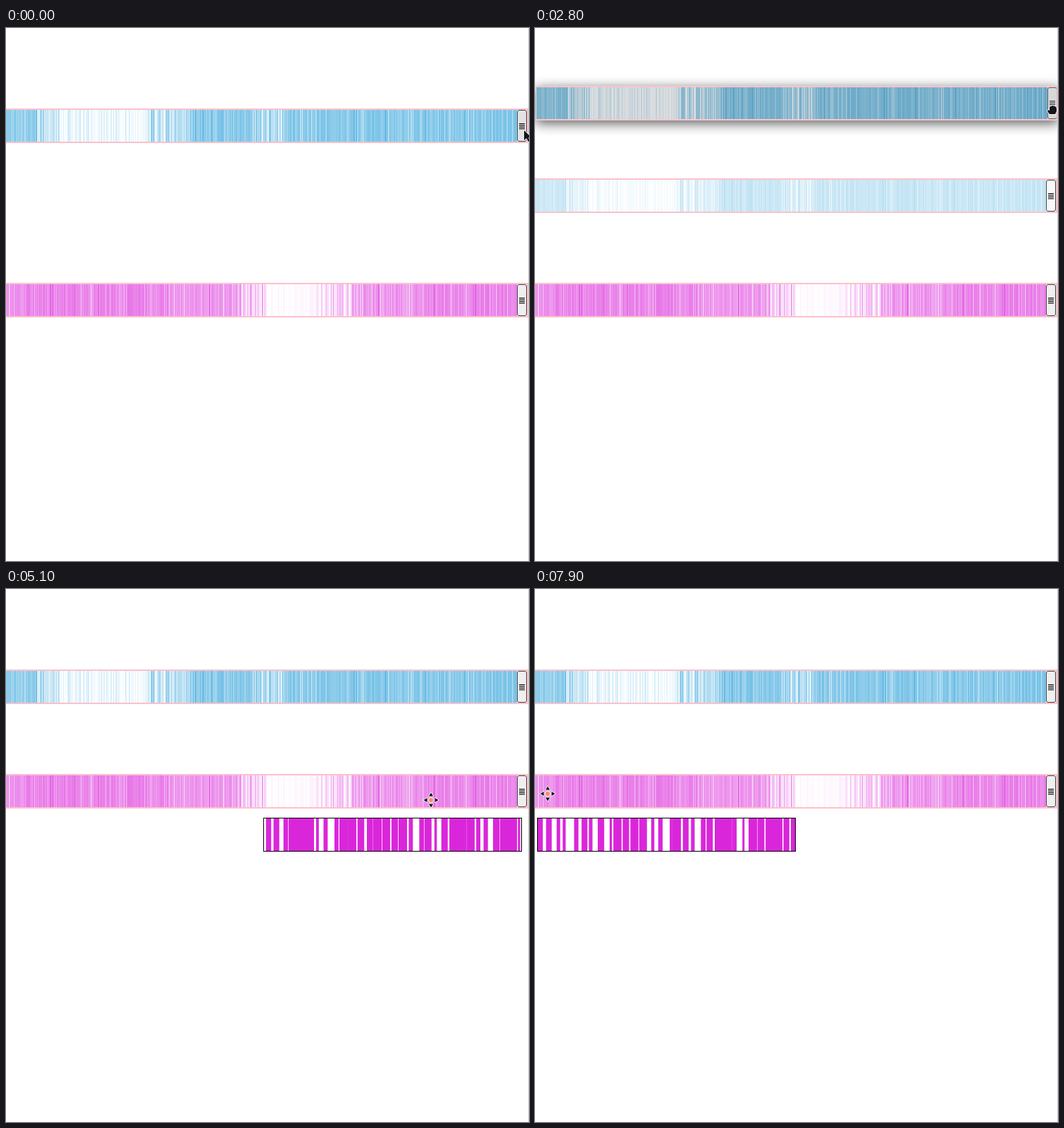
Animation, 742 px wide and 755 px high, one loop 8000 ms. Source, as an HTML page with a canvas:

```html
<!DOCTYPE html>
<html lang="en">
<head>
<meta charset="utf-8">
<title>Reordering stripe tracks</title>
<style>
html, body { margin: 0; width: 100%; height: 100%; overflow: hidden; background: #fff; }
canvas { display: block; }
</style>
</head>
<body>
<canvas id="stage" width="742" height="755"></canvas>
<script>
const ctx = document.getElementById('stage').getContext('2d');
const W = 742, H = 755, LOOP = 8000, STEP = 100;
const DATA_W = 725, ROW_H = 49, GRAB_Y = 31;
const LENS_W = 367, LENS_Y = 324, LENS_H = 48, ZOOM = 24;
const LENS_START = 4400;
const MAGENTA = '#da26da';

// [x, mean coverage]
const blueDensity = [[0, .5], [41, .5], [44, .3], [70, .27], [76, .1], [199, .06], [205, .3],
  [245, .28], [267, .53], [345, .54], [349, .38], [390, .38], [393, .53], [725, .55]];
const pinkDensity = [[0, .53], [224, .53], [228, .44], [315, .47], [340, .2], [368, .2],
  [370, .02], [433, .02], [453, .15], [490, .22], [518, .46], [582, .42], [585, .53], [725, .53]];

// [time, x, y]
const cursorPath = [[0, 735, 145], [300, 735, 145], [1200, 735, 215], [1400, 735, 215],
  [1700, 735, 244], [2000, 735, 244], [2400, 735, 128], [2800, 735, 113], [2900, 735, 113],
  [3400, 735, 392], [4000, 735, 301], [4200, 735, 301], [LENS_START, 722, 295],
  [5800, 483, 303], [6300, 356, 296], [7000, 131, 287], [7900, 18, 290]];

const drags = [
  { row: 'blue', from: 400, to: 1300 },
  { row: 'blue', from: 2100, to: 3000 },
  { row: 'pink', from: 3500, to: 4100 }
];

function seeded(seed) {
  return () => {
    seed = (seed + 0x6D2B79F5) | 0;
    let v = Math.imul(seed ^ (seed >>> 15), 1 | seed);
    v = (v + Math.imul(v ^ (v >>> 7), 61 | v)) ^ v;
    return ((v ^ (v >>> 14)) >>> 0) / 4294967296;
  };
}

// Linear interpolation through points of the form [key, ...values]
function along(points, key) {
  const i = points.findIndex(p => p[0] > key);
  if (i < 0) return points[points.length - 1].slice(1);
  const a = points[i - 1], b = points[i];
  const k = (key - a[0]) / (b[0] - a[0]);
  return a.slice(1).map((v, j) => v + (b[j + 1] - v) * k);
}

function makeStripes(color, density, seed) {
  const strip = document.createElement('canvas');
  strip.width = DATA_W;
  strip.height = ROW_H - 4;
  const c = strip.getContext('2d');
  const rand = seeded(seed);
  c.fillStyle = color;
  for (let x = 0; x < DATA_W; x++) {
    const [d] = along(density, x);
    // Sparse areas get a few strong lines, dense areas an even tone
    const skew = Math.max(.2, 2.5 - 5 * d);
    const accent = rand() < d * .06 ? .25 : 0;
    c.globalAlpha = Math.min(.85, d * (skew + 1) * rand() ** skew + accent);
    c.fillRect(x, 0, 1, strip.height);
  }
  return strip;
}

const strips = {
  blue: makeStripes('#2ca0d9', blueDensity, 11),
  pink: makeStripes(MAGENTA, pinkDensity, 29)
};

function drawBorder(x, y) {
  ctx.fillStyle = '#ffc0cb';
  ctx.fillRect(x, y, 741, 2);
  ctx.fillRect(x, y + ROW_H - 2, 741, 2);
  ctx.fillRect(x + 739, y, 2, ROW_H);
}

function drawHandle(x, y, fill) {
  ctx.beginPath();
  ctx.roundRect(x + 725.5, y + 2.5, 13, 44, 2.5);
  ctx.fillStyle = fill;
  ctx.fill();
  ctx.strokeStyle = '#444';
  ctx.lineWidth = 1;
  ctx.stroke();
  ctx.fillStyle = '#000';
  for (let i = 0; i < 4; i++) ctx.fillRect(x + 728, y + 21 + i * 2.4, 8, 1.1);
}

function drawRow(strip, y, faded, hover) {
  ctx.globalAlpha = faded ? .45 : 1;
  ctx.drawImage(strip, 0, y + 2);
  ctx.globalAlpha = 1;
  drawHandle(0, y, hover ? '#e3e3e3' : faded ? '#f8f8f8' : '#efefef');
  drawBorder(0, y);
}

function drawGhost(strip, y) {
  const x = 2;
  ctx.save();
  ctx.shadowColor = 'rgba(0,0,0,.65)';
  ctx.shadowBlur = 17;
  ctx.shadowOffsetY = 4;
  ctx.fillStyle = '#dedede';
  ctx.fillRect(x - 1, y, W, ROW_H);
  ctx.restore();
  ctx.save();
  ctx.globalCompositeOperation = 'multiply';
  ctx.drawImage(strip, x, y + 2);
  ctx.globalAlpha = .75;
  drawHandle(x, y, '#f5f5f5');
  ctx.restore();
  ctx.globalAlpha = .85;
  drawBorder(x - 1, y);
  ctx.globalAlpha = 1;
}

function drawLens(cursorX) {
  const left = Math.max(3, Math.min(365, cursorX - 166));
  const cellW = ZOOM / 2;
  ctx.save();
  ctx.beginPath();
  ctx.rect(left, LENS_Y, LENS_W, LENS_H);
  ctx.clip();
  ctx.fillStyle = '#fff';
  ctx.fillRect(left, LENS_Y, LENS_W, LENS_H);
  ctx.fillStyle = MAGENTA;
  // Two cells per data pixel, each holding at most one bar
  for (let cell = cursorX * 2; cell < Math.min(DATA_W, cursorX + 17) * 2; cell++) {
    const rand = seeded(cell * 7919);
    const fill = along(pinkDensity, cell / 2)[0] * 1.5;
    if (rand() > fill + .2) continue;
    const w = cellW * Math.min(1, fill * (.3 + 1.4 * rand()));
    const x = (cell - cursorX * 2) * cellW + rand() * (cellW - w);
    ctx.fillRect(left + x, LENS_Y, w, LENS_H);
  }
  ctx.restore();
  ctx.strokeStyle = '#000';
  ctx.lineWidth = 1;
  ctx.strokeRect(left + .5, LENS_Y + .5, LENS_W - 1, LENS_H - 1);
}

function polygon(points) {
  ctx.beginPath();
  for (const [x, y] of points) ctx.lineTo(x, y);
  ctx.closePath();
  ctx.stroke();
  ctx.fill();
}

const cursors = {
  arrow() {
    polygon([[0, 0], [0, 14], [3.5, 11], [6, 16], [8, 15], [6, 10.5], [11, 10.5]]);
  },
  hand() {
    polygon([[-5, 9], [-8, 5], [-7, 3], [-5, 4], [-5, -1], [-1, -3], [3, -2], [5, 0], [5, 5], [3, 9]]);
  },
  move() {
    for (let i = 0; i < 4; i++) {
      polygon([[0, -10.5], [3, -5.5], [-3, -5.5]]);
      ctx.rotate(Math.PI / 2);
    }
    ctx.beginPath();
    ctx.arc(0, 0, 3, 0, 7);
    ctx.fillStyle = '#f4905f';
    ctx.stroke();
    ctx.fill();
  }
};

function drawCursor(kind, x, y) {
  ctx.save();
  ctx.translate(x, y);
  ctx.fillStyle = '#15151c';
  ctx.strokeStyle = 'rgba(255,255,255,.75)';
  ctx.lineWidth = 2;
  ctx.lineJoin = 'round';
  cursors[kind]();
  ctx.restore();
}

function render(t) {
  const [x, y] = along(cursorPath, t).map(Math.round);
  const drag = drags.find(d => t >= d.from && t < d.to);
  const kind = drag ? 'hand' : t >= LENS_START ? 'move' : 'arrow';
  const rowY = {
    blue: t >= drags[0].to && t < drags[1].to ? 213 : 114,
    pink: t < drags[2].to ? 361 : 262
  };
  ctx.fillStyle = '#fff';
  ctx.fillRect(0, 0, W, H);
  for (const name in strips) {
    const top = rowY[name];
    const hover = kind === 'arrow' && y > top && y < top + ROW_H;
    drawRow(strips[name], top, drag?.row === name, hover);
  }
  if (drag) drawGhost(strips[drag.row], y - GRAB_Y);
  if (kind === 'move') drawLens(x);
  ctx.fillStyle = '#ccc';
  ctx.fillRect(W - 1, 0, 1, H);
  drawCursor(kind, x, y);
}

const start = performance.now();
function tick() {
  const t = (performance.now() - start) % LOOP;
  render(Math.floor(t / STEP) * STEP);
  requestAnimationFrame(tick);
}
tick();
</script>
</body>
</html>
```
